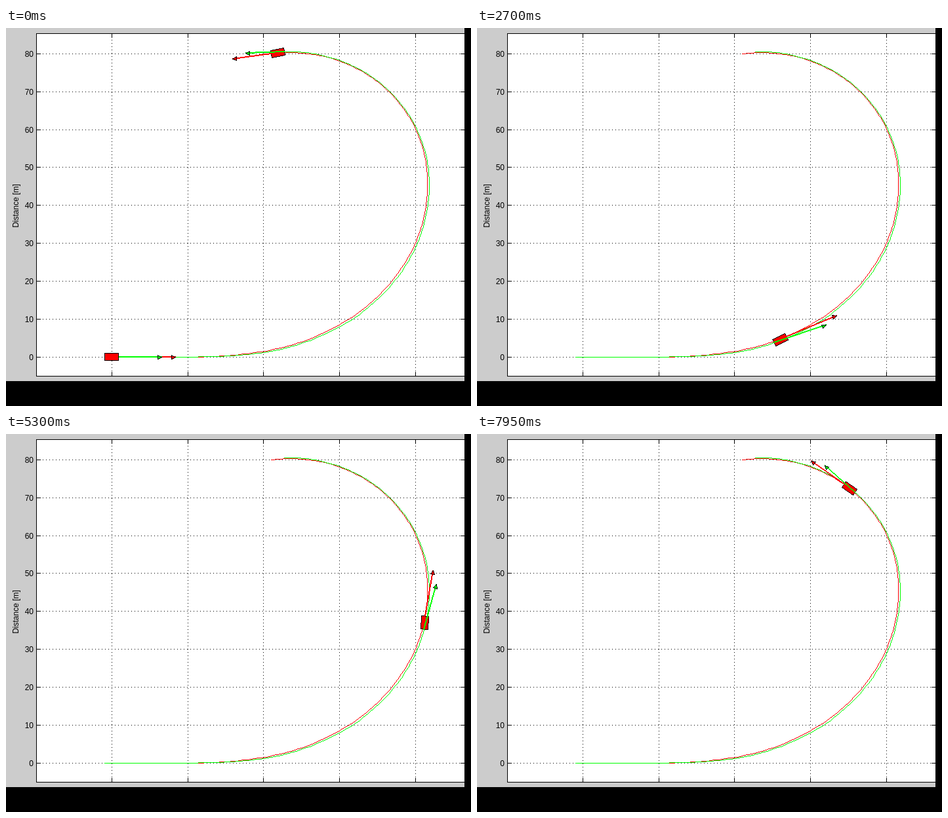
Animation, 709 px wide and 577 px high, one loop 8000 ms. Source, as an HTML page with a canvas:

```html
<!DOCTYPE html>
<html lang="en">
<head>
<meta charset="utf-8">
<title>Vehicle trajectory</title>
<style>
html, body { margin: 0; width: 100%; height: 100%; overflow: hidden; background: #000; }
canvas { display: block; }
</style>
</head>
<body>
<canvas id="stage" width="709" height="577"></canvas>
<script>
const ctx = document.getElementById("stage").getContext("2d");
const LOOP = 8000, STEP = 50, LAST = 199;
const HALF_LENGTH = 10.5, HALF_WIDTH = 5.5;
const LOOKAHEAD = 15; // steps of travel shown by a velocity arrow
const ORIGIN = { x: 161.3, y: 502.2 }, PX_PER_M = 5.785;
const RED = "#f00", GREEN = "#0f0", BLACK = "#000";

// Poses: step, x, y, travel over the lookahead (x, y), heading in degrees, turn rate
const poses = [
  [0, 161, 502.2, 86.8, 0, 0, 0],
  [19, 270.9, 502.2, 86.8, 0, 0, 0],
  [40, 391.3, 494.5, 85, -13, 13.5, 1.02],
  [66, 525.8, 444, 68, -44, 41.5, 1.1],
  [88, 606.5, 363.7, 41, -63, 65.5, 1.12],
  [123, 641.3, 206.2, -10.9, -65.6, 105.5, 1.13],
  [158, 568, 83, -48, -38, 144, 1.12],
  [199, 414.5, 38, -59, 5, 189.5, 1.1]
];

function hermite(u, span, p, m, q, k) {
  const u2 = u * u, u3 = u2 * u;
  return p * (2 * u3 - 3 * u2 + 1) + m * span * (u3 - 2 * u2 + u) +
    q * (3 * u2 - 2 * u3) + k * span * (u3 - u2);
}

function poseAt(n) {
  let i = 0;
  while (i < poses.length - 2 && n > poses[i + 1][0]) i++;
  const a = poses[i], b = poses[i + 1], span = b[0] - a[0], u = (n - a[0]) / span;
  const mix = (value, rate, scale) =>
    hermite(u, span, a[value], a[rate] / scale, b[value], b[rate] / scale);
  return {
    x: mix(1, 3, LOOKAHEAD),
    y: mix(2, 4, LOOKAHEAD),
    angle: mix(5, 6, 1) * Math.PI / 180
  };
}

// Point in the car's own frame, turned onto the stage
function onCar(pose, along, across) {
  const c = Math.cos(pose.angle), s = Math.sin(pose.angle);
  return { x: pose.x + along * c + across * s, y: pose.y - along * s + across * c };
}

const axle = (n, side) => onCar(poseAt(n), side * HALF_LENGTH, 0);

// Hard-edged line without antialiasing
function line(a, b, color, width = 1) {
  const x0 = Math.floor(a.x), y0 = Math.floor(a.y);
  const dx = Math.floor(b.x) - x0, dy = Math.floor(b.y) - y0;
  const count = Math.max(Math.abs(dx), Math.abs(dy), 1);
  const flat = Math.abs(dx) >= Math.abs(dy);
  const shift = width - 1;
  ctx.fillStyle = color;
  for (let i = 0; i <= count; i++) {
    const x = Math.round(x0 + dx * i / count), y = Math.round(y0 + dy * i / count);
    if (flat) ctx.fillRect(x, y - shift, 1, width);
    else ctx.fillRect(x - shift, y, width, 1);
  }
}

function polygon(points, color) {
  ctx.beginPath();
  points.forEach(p => ctx.lineTo(Math.floor(p.x) + 0.5, Math.floor(p.y) + 0.5));
  ctx.closePath();
  ctx.fillStyle = color;
  ctx.fill();
  points.forEach((p, i) => line(p, points[(i + 1) % points.length], BLACK));
}

function drawTrace(side, color) {
  for (let n = 0; n < LAST; n++) line(axle(n, side), axle(n + 1, side), color);
}

function drawArrow(n, side, color) {
  const start = axle(n, side), e = 0.01;
  const before = axle(n - e, side), after = axle(n + e, side);
  const vx = (after.x - before.x) / (2 * e), vy = (after.y - before.y) / (2 * e);
  const tip = { x: start.x + vx * LOOKAHEAD, y: start.y + vy * LOOKAHEAD };
  const head = { x: tip.x, y: tip.y, angle: Math.atan2(-vy, vx) };
  line(start, tip, color, 2);
  polygon([tip, onCar(head, -6, -3), onCar(head, -6, 3)], color);
}

function drawArrows(n) {
  drawArrow(n, 1, RED);
  drawArrow(n, -1, GREEN);
}

function drawCar(n) {
  const pose = poseAt(n);
  const corners = [[-1, -1], [1, -1], [1, 1], [-1, 1]];
  polygon(corners.map(([a, b]) => onCar(pose, a * HALF_LENGTH, b * HALF_WIDTH)), RED);
}

function drawAxes() {
  const left = 46, right = 699, top = 8, bottom = 531, tick = 6;
  ctx.fillStyle = BLACK;
  ctx.fillRect(0, 0, 709, 577);
  ctx.fillStyle = "#ccc";
  ctx.fillRect(0, 0, right, 539);
  ctx.fillStyle = "#fff";
  ctx.fillRect(left, top, right - left, bottom - top);
  ctx.fillStyle = BLACK;
  ctx.fillRect(left, top, right - left, 1);
  ctx.fillRect(left, bottom, right - left, 1);
  ctx.fillRect(left, top, 1, bottom - top);

  ctx.font = "12px 'Liberation Sans', Arial, sans-serif";
  ctx.textAlign = "right";
  for (let m = 0; m <= 80; m += 10) {
    const y = Math.floor(ORIGIN.y - m * PX_PER_M);
    for (let x = left; x < right; x += 5) ctx.fillRect(x, y, 1, 1);
    ctx.fillRect(left, y, tick + 1, 1);
    ctx.fillRect(right - tick, y, tick, 1);
    ctx.fillText(m, 42, y + 5);
  }
  for (let m = 0; m <= 80; m += 20) {
    const x = Math.floor(ORIGIN.x + m * PX_PER_M);
    for (let y = top; y < bottom; y += 5) ctx.fillRect(x, y, 1, 1);
    ctx.fillRect(x, top, 1, tick + 1);
    ctx.fillRect(x, bottom - tick, 1, tick + 1);
  }
  ctx.save();
  ctx.translate(19, 271.5);
  ctx.rotate(-Math.PI / 2);
  ctx.textAlign = "center";
  ctx.fillText("Distance [m]", 0, 0);
  ctx.restore();
}

function draw(time) {
  const step = Math.floor((time % LOOP) / STEP);
  drawAxes();
  drawTrace(1, RED);
  drawTrace(-1, GREEN);
  if (step === 0) {
    drawArrows(0);
    drawCar(0);
  }
  const n = step === 0 ? LAST : step - 1;
  drawCar(n);
  drawArrows(n);
}

const began = performance.now();
function tick() {
  draw(performance.now() - began);
  requestAnimationFrame(tick);
}
tick();
</script>
</body>
</html>
```
